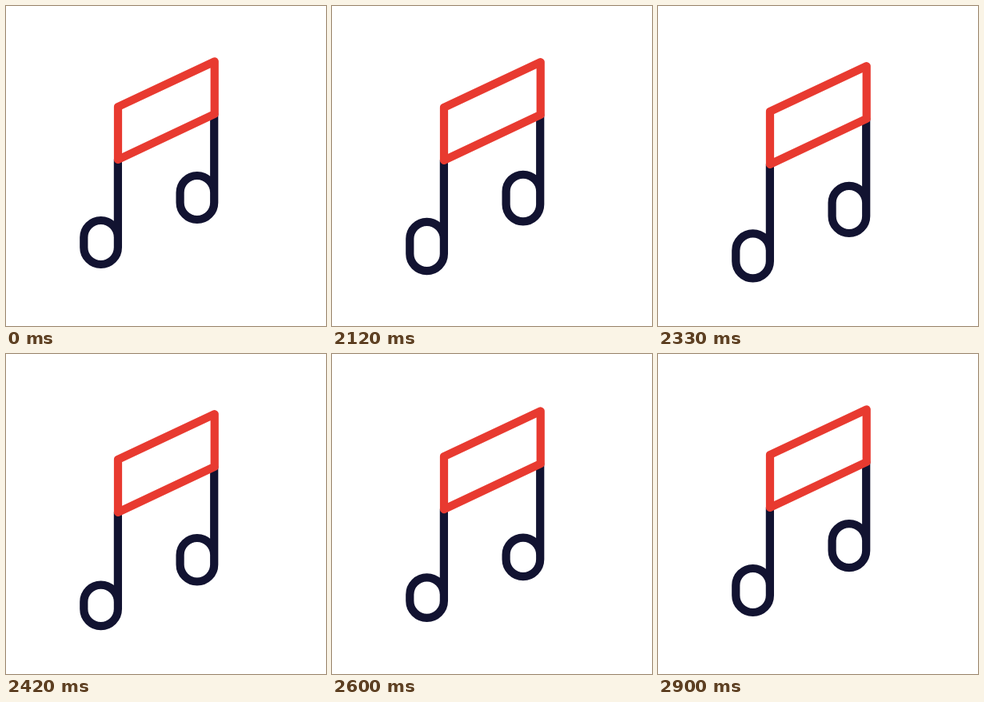
An HTML page for the animation above (2.99 s loop, 400 px wide and 400 px high).

```html
<!DOCTYPE html>
<html lang="en">
<head>
<meta charset="utf-8">
<title>Music note</title>
<style>
html, body { margin: 0; width: 100%; height: 100%; overflow: hidden; background: #fff; }
svg { display: block; width: 100%; height: 100%; }
path { fill: none; stroke-width: 10.2; stroke-linecap: round; stroke-linejoin: round; }
.note { stroke: #121331; }
.beam { stroke: #e83a30; }
</style>
</head>
<body>
<svg viewBox="0 0 400 400">
  <path class="note" id="left"/>
  <path class="note" id="right"/>
  <path class="beam" id="beam" d="M140 126 260.7 69.3V135L140 192Z"/>
</svg>
<script>
const LOOP = 2990, START = 2030, STEP = 30, LAST = 29;
const KEY_START = 1970, KEY_GAP = 60, LAG = 60;

// Offsets in pixels, one key every KEY_GAP ms
const drop = [0, .4, 5, 11, 14.3, 17, 17.4, 17.4, 16.5, 13.2, 9, 5, 2.4, 1, .2, 0];
const stretch = [0, 2, 5.2, 7, 7, 4.2, 1, -2, -5, -7, -5.6, -3.3, -1.6, -.6, -.1, 0];
const dip = [0, 0, .4, 1.6, 3.3, 5, 5.9, 6, 5.7, 4.7, 3, 1.4, .5, .2, 0, 0];

const left = document.getElementById('left');
const right = document.getElementById('right');
const beam = document.getElementById('beam');

// Smooth curve through evenly spaced keys
function sample(keys, time) {
  const pos = (time - KEY_START) / KEY_GAP;
  const i = Math.floor(pos), u = pos - i;
  const key = n => keys[n] || 0;
  const a = key(i - 1), b = key(i), c = key(i + 1), d = key(i + 2);
  return b + u / 2 * (c - a + u * (2 * a - 5 * b + 4 * c - d + u * (3 * (b - c) + d - a)));
}

function notePath(x, stemTop, bottom, length) {
  const r = 21.3;
  const low = bottom - r, high = bottom - length + r;
  return `M${x} ${stemTop}V${low}A${r} ${r} 0 0 1 ${x - 2 * r} ${low}` +
    `V${high}A${r} ${r} 0 0 1 ${x} ${high}`;
}

function draw(time) {
  const step = Math.min(LAST, Math.floor((time - START) / STEP));
  const t = step < 0 ? 0 : START + step * STEP;
  const shift = sample(dip, t);
  const place = (el, x, top, bottom, at) => el.setAttribute('d',
    notePath(x, top + shift, bottom + sample(drop, at), 55 + sample(stretch, at)));
  place(left, 139.9, 192, 323, t);
  place(right, 260.2, 135, 267, t - LAG);
  beam.setAttribute('transform', `translate(0 ${shift})`);
}

const begin = performance.now();
function tick() {
  draw((performance.now() - begin) % LOOP);
  requestAnimationFrame(tick);
}
tick();
</script>
</body>
</html>
```
